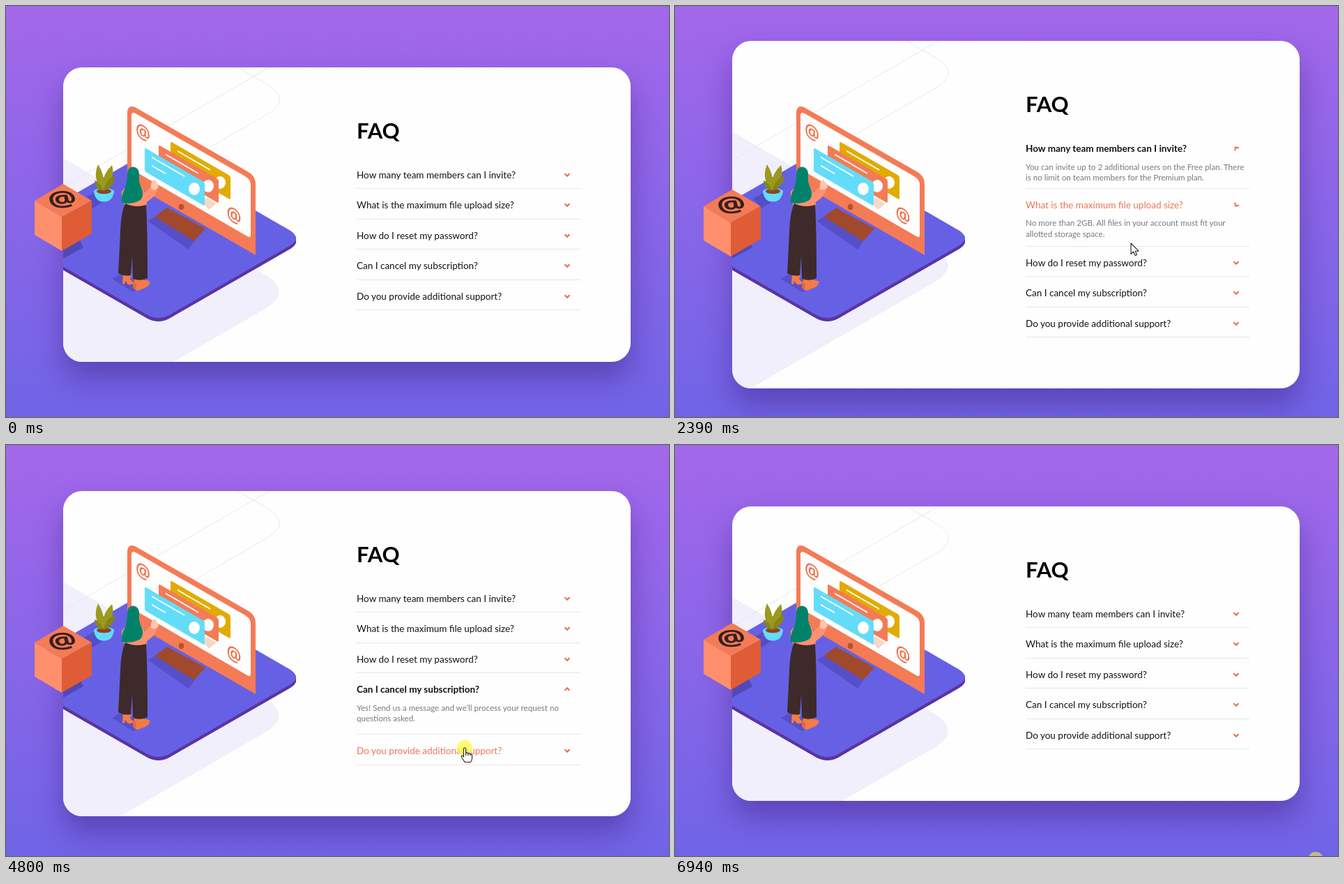
These frames come from a looping animation (951 px wide and 589 px high, 7 s). An HTML page:

```html
<!DOCTYPE html>
<html lang="en">
<head>
<meta charset="utf-8">
<title>FAQ accordion</title>
<style>
  html, body { margin: 0; width: 100%; height: 100%; overflow: hidden; }
  body { position: relative; background: linear-gradient(#a367ea, #7064e6); font-family: Lato, "Open Sans", sans-serif; }
  svg { position: absolute; left: 0; top: 0; overflow: visible; }
  #card { position: absolute; left: 82px; width: 814px; border-radius: 27px; background: #fefefe;
    overflow: hidden; box-shadow: 0 24px 40px rgba(53, 18, 110, .38); }
  #pattern { left: -82px; top: -88px; }
  #art { left: -82px; }
  h1 { position: absolute; left: 421px; top: 70px; margin: 0; font-size: 31px; line-height: 40px; color: #000; }
  ul { position: absolute; left: 421px; top: 131px; width: 321px; margin: 0; padding: 0; list-style: none; }
  li { position: relative; box-sizing: border-box; overflow: hidden; border-bottom: 1px solid #e7e7ea; }
  b { position: absolute; left: 0; top: 13px; font-size: 13.5px; line-height: 20px; font-weight: 400; white-space: nowrap; }
  p { position: absolute; left: 0; top: 41.8px; margin: 0; font-size: 11.6px; line-height: 15.3px; color: #787882; white-space: nowrap; }
  li svg { left: 301.5px; top: 23px; }
</style>
</head>
<body>
<div id="card">
  <svg id="pattern" width="951" height="700">
    <path d="M60 205 82 218 375 387Q408 410 375 432L240 510 82 601 60 614Z" fill="#f0effb"/>
    <path d="M310 75 379 115Q405 133 380 152L82 324M395 78 82 259" fill="none" stroke="#e7e7ec"/>
  </svg>
  <svg id="art" width="951" height="589">
    <!-- floor -->
    <path d="M60 298 195 220Q207 212 219 219L408 327Q424 338 408 348L234 448Q219 456 203 448L60 366Z" fill="#5b34a0"/>
    <path d="M416 331V340L400 350V325Z" fill="#5b34a0"/>
    <path d="M60 291.7 195 214Q207 206 219 213L408 322Q424 333 408 343L234 443Q219 451 203 443L60 361Z" fill="#6661e4"/>
    <path d="M82 362V345L106 336 111 346Z" fill="#5148b6"/>
    <path d="M112 276 128 267 142 279 124 290Z" fill="#554dc6"/>
    <path d="M203 308 214 302 271 336 262 349Z" fill="#564fc9"/>
    <path d="M152 391 168 382 196 402 182 410Z" fill="#584fc8"/>
    <!-- monitor -->
    <path d="M213 302 231 289 286 319 270 337Z" fill="#a1492c"/>
    <path d="M174 152Q175 141 185 145L348 238Q358 244 358 255V357L174 251Z" fill="#f47b56"/>
    <path d="M180 157Q180 151 186 154L343 244Q351 249 351 256V328Q351 333 346 330L180 234Z" fill="#fefefe"/>
    <ellipse cx="251.5" cy="288" rx="3.8" ry="4.2" fill="#b25330"/>
    <g fill="#f06f49" font-family="'Open Sans', sans-serif" font-size="27" font-weight="600" text-anchor="middle">
      <text transform="matrix(.87 .5 0 1 196.500 182)" dy=".3em">@</text>
      <text transform="matrix(.87 .5 0 1 327 301)" dy=".3em">@</text>
    </g>
    <path d="M284 284 286 274 302 283 291 292Z" fill="#f5d8c8"/>
    <g id="panels"></g>
    <!-- plant -->
    <path d="M126 265Q128 281 140 280.500Q153 281 155 265Z" fill="#63dcfa"/>
    <ellipse cx="140.500" cy="266" rx="14.500" ry="5" fill="#63dcfa"/>
    <ellipse cx="140.500" cy="265.500" rx="10.500" ry="3.800" fill="#8c4324"/>
    <g fill="#9b9a1d">
      <path d="M139 264Q123 248 132 227Q144 246 139 264Z"/>
      <path d="M139 264Q136 243 152 228Q158 247 139 264Z"/>
      <path d="M140 265Q143 247 157 244Q155 259 140 265Z" fill="#85851a"/>
      <path d="M139 265Q128 263 127 250Q136 253 139 265Z" fill="#85851a"/>
    </g>
    <!-- figure -->
    <path d="M168 383 180 386 178 391 183 397Q181 400 175 399L171 394 170 399 167 398Z" fill="#f47b46"/>
    <path d="M184 390 195 392 206 394Q208 400 199 404L189 408 184 406Z" fill="#f47b46"/>
    <path d="M187 399 186 407 182 404V393Z" fill="#e2683a"/>
    <path d="M166 266Q180 250 194 259L199 267 209 258 217 262Q216 272 202 281L201 288 171 287Q165 280 166 266Z" fill="#ff9070"/>
    <path d="M208 262Q207 252 212 249Q217 252 219 259Q215 266 208 262Z" fill="#ffc6b4"/>
    <path d="M174 241Q174 230 183 230.500Q192 232 191 244Q190 252 194 260Q199 270 193 278Q181 285 166 282Q165 272 170 263Q174 253 174 241Z" fill="#00826a"/>
    <path d="M171 283Q186 290 201 285Q203 320 203 390Q193 395 182 391L181 358 179 386Q170 388 161 383Q163 345 164 322Q165 296 171 283Z" fill="#3e2a2a"/>
  </svg>
  <h1>FAQ</h1>
  <ul id="list"></ul>
</div>
<svg id="cube" width="130" height="400">
  <path d="M82 255 123 279 80 302.500 41 279Z" fill="#f47b56"/>
  <path d="M41 279 80 302.500V351L41 328Z" fill="#ff8f6d"/>
  <path d="M80 302.500 123 279V326L80 351Z" fill="#e05c36"/>
  <text transform="matrix(.95 -.1 .22 .62 81 278)" dy=".3em" text-anchor="middle" font-family="'Open Sans', sans-serif" font-weight="700" font-size="48" fill="#351f1f">@</text>
</svg>
<svg id="cursor" width="30" height="30">
  <circle id="halo" r="11" fill="#fffa3c" fill-opacity=".75"/>
  <g id="arrow" fill="#fff" stroke="#222" stroke-width="1.100" stroke-linejoin="round">
    <path d="M0 0V15.500L3.600 12.200 6 17.500 8.500 16.400 6.200 11.200H11Z"/>
  </g>
  <path id="beam" d="M-3-6.500H-1L0-5.500 1-6.500H3M0-5.500V5.500M-3 6.500H-1L0 5.500 1 6.500H3" fill="none" stroke="#222" stroke-width="1.200"/>
  <g id="hand" fill="#fff" stroke="#222" stroke-width="1.100" stroke-linejoin="round">
    <path d="M-1.500 1Q0-1 1.600 1V7.500Q3.500 6 4.800 8Q6.800 7 7.800 9Q10.300 8.500 10.500 11V15Q10.500 18 8.500 20.500H0Q-2 17-4.800 13Q-5.200 10.500-3 11.200L-1.500 13Z"/>
    <path d="M1.600 7.500V11M4.800 8V11M7.800 9V11.500" fill="none"/>
  </g>
</svg>
<script>
const LOOP = 7000, TURN = 500, ROW = 43.45, BASE = 421.8;
const CORAL = [236, 118, 88], INK = [18, 18, 26];
const $ = id => document.getElementById(id);
const clamp = v => Math.max(0, Math.min(1, v));

// question, answer, open time, close time
const items = [
  ["How many team members can I invite?", "You can invite up to 2 additional users on the Free plan. There<br>is no limit on team members for the Premium plan.", 1230, 2295],
  ["What is the maximum file upload size?", "No more than 2GB. All files in your account must fit your<br>allotted storage space.", 2295, 3195],
  ["How do I reset my password?", "Click “Forgot password” from the login page or “Change<br>password” from your profile page. A reset link will be emailed<br>to you.", 3195, 3900],
  ["Can I cancel my subscription?", "Yes! Send us a message and we’ll process your request no<br>questions asked.", 3900, 4850],
  ["Do you provide additional support?", "Chat and email support is available 24/7. Phone lines are open<br>during normal business hours.", 4850, 6200]
].map(([q, a, open, close]) => {
  const li = document.createElement("li");
  li.innerHTML = `<b>${q}</b><p>${a}</p><svg width="1" height="1"><path d="M-3.500-1.700 0 1.800 3.500-1.700" fill="none" stroke="#ea6c48" stroke-width="2"/></svg>`;
  $("list").append(li);
  return { li, open, close, title: li.children[0], text: li.children[1],
    chevron: li.querySelector("path"), full: 14.1 + 15.3 * a.split("<br>").length };
});

// three slanted panels, back to front
$("panels").innerHTML = [[236, 194, "#e2ab00"], [219, 199, "#f47b56"], [199, 203, "#63dcfa"]].map(([x, y, fill]) =>
  `<g transform="matrix(1 .577 0 1 ${x} ${y})"><rect width="86" height="34" rx="2.500" fill="${fill}"/>
  <path d="M10 8H57M10 20H30" stroke="#fff" stroke-width="2"/></g>
  <ellipse cx="${x + 71}" cy="${y + 59}" rx="8" ry="9" fill="#fff"/>`).join("");

// time, x, y
const path = [
  [20, 919, 592], [350, 770, 380], [700, 674, 246], [1230, 671, 230], [1480, 672, 260],
  [1900, 666, 303], [2270, 658, 308], [2390, 654, 340], [2800, 657, 352], [3190, 658, 355],
  [3320, 661, 375], [3650, 661, 400], [3900, 660, 402], [4350, 659, 420], [4700, 658, 434],
  [4900, 658, 434], [5300, 720, 412], [5800, 800, 397], [6240, 801, 398], [6500, 895, 574], [6600, 905, 602]
];

function place(t) {
  const i = path.findIndex(k => k[0] > t);
  if (i < 1) return [919, 594];
  const [a, b] = [path[i - 1], path[i]];
  let u = (t - a[0]) / (b[0] - a[0]);
  u = u * u * (3 - 2 * u);
  return [a[1] + (b[1] - a[1]) * u, a[2] + (b[2] - a[2]) * u];
}

function extra(it, t, p) {
  const gap = t < it.close ? 6 * (1 - p) : Math.min(7.5, 60 * (1 - p));
  return Math.max(0, Math.min(214 * p, it.full - gap));
}

const mix = (a, b, u) => `rgb(${a.map((v, i) => Math.round(v + (b[i] - v) * u))})`;

function draw(t) {
  const turns = items.map(it => clamp((t - it.open) / TURN) - clamp((t - it.close) / TURN));
  const grow = items.map((it, i) => extra(it, t, turns[i]));
  const sum = grow.reduce((a, b) => a + b, 0);
  const top = Math.round(299 - (BASE + sum) / 2), height = 598 - 2 * top;
  $("card").style.top = top + "px";
  $("card").style.height = height + "px";
  $("art").style.top = -top + "px";
  $("cube").style.top = sum * .1 + "px";

  const [x, y] = place(t);
  const inside = x > 503 && x < 824;
  let shape = "arrow", edge = top + 131;
  items.forEach((it, i) => {
    const p = turns[i], h = ROW + grow[i], dy = y - edge - 23;
    const over = inside && y >= edge && y < edge + h;
    if (over && Math.abs(dy) < 17) shape = "hand";
    else if (over && p > 0 && dy > 17 && dy < 50) shape = "beam";
    it.li.style.height = h + "px";
    it.text.style.visibility = p > 0 ? "visible" : "hidden";
    it.title.style.fontWeight = p > .55 ? 700 : 400;
    it.title.style.color = over && t < it.close ? mix(CORAL, INK, clamp(p * 2 - 1)) : mix(INK, INK, 0);
    it.chevron.setAttribute("transform", `rotate(${180 * p})`);
    edge += h;
  });

  const ending = t >= 6940, shown = t >= 20 && t < 6600;
  $("cursor").style.transform = `translate(${x}px, ${y}px)`;
  for (const id of ["arrow", "beam", "hand"]) $(id).style.display = shown && shape === id ? "" : "none";
  $("halo").style.display = ending || shown && shape === "hand" ? "" : "none";
  $("halo").style.opacity = ending ? .75 : 1;
}

const start = performance.now();
function tick() {
  draw((performance.now() - start) % LOOP);
  requestAnimationFrame(tick);
}
tick();
</script>
</body>
</html>
```
